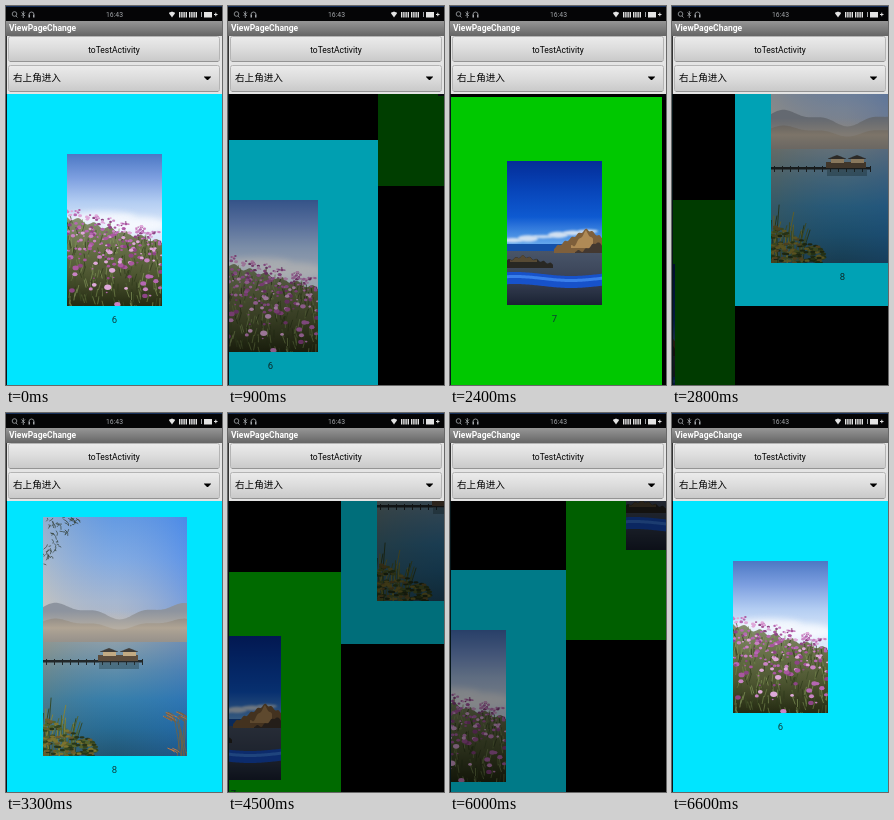
Write an HTML page with a canvas that moves like this. It is 216 by 379 pixels and loops after 6.7 s.

```html
<!DOCTYPE html>
<html lang="zh">
<head>
<meta charset="utf-8">
<title>ViewPageChange</title>
<style>
html, body { margin: 0; width: 100%; height: 100%; overflow: hidden; background: #000; }
canvas { display: block; width: 216px; height: 379px; }
</style>
</head>
<body>
<canvas id="stage"></canvas>
<script>
const W = 216, H = 379, LOOP = 6700;
const PAGE = { x: 1, y: 88, w: 215, h: 298 };
const scale = Math.max(1, window.devicePixelRatio || 1);
const { sin, abs, min, max, round, floor, exp, PI } = Math;

function setup(canvas, w, h) {
  canvas.width = round(w * scale);
  canvas.height = round(h * scale);
  const c = canvas.getContext('2d');
  c.scale(scale, scale);
  return c;
}

function layer(w, h, paint) {
  const canvas = document.createElement('canvas');
  paint(setup(canvas, w, h));
  return canvas;
}

function rect(c, x, y, w, h, fill) {
  c.fillStyle = fill;
  c.fillRect(x, y, w, h);
}

// Evenly spaced colour stops, along y by default.
function fade(c, from, to, colors, across = false) {
  const g = across ? c.createLinearGradient(from, 0, to, 0) : c.createLinearGradient(0, from, 0, to);
  colors.forEach((color, i) => g.addColorStop(i / (colors.length - 1), color));
  return g;
}

// Fills between the curves top(x) and bottom(x).
function band(c, x0, x1, top, bottom, fill) {
  c.fillStyle = fill;
  c.beginPath();
  for (let x = x0; x <= x1; x++) c.lineTo(x, top(x));
  for (let x = x1; x >= x0; x--) c.lineTo(x, bottom(x));
  c.fill();
}

function oval(c, x, y, rx, ry, fill) {
  c.fillStyle = fill;
  c.beginPath();
  c.ellipse(x, y, rx, ry, 0, 0, 2 * PI);
  c.fill();
}

function line(c, color, width, x0, y0, x1, y1, bend = 0) {
  c.strokeStyle = color;
  c.lineWidth = width;
  c.beginPath();
  c.moveTo(x0, y0);
  c.quadraticCurveTo((x0 + x1) / 2 + bend, (y0 + y1) / 2, x1, y1);
  c.stroke();
}

function text(c, s, x, y, font, fill, align = 'left') {
  c.font = font;
  c.textAlign = align;
  c.fillStyle = fill;
  c.fillText(s, x, y);
}

function scatter(n, seed, put) {
  const rnd = () => (seed = (seed * 16807) % 2147483647) / 2147483647;
  const pick = list => list[floor(rnd() * list.length)];
  for (let i = 0; i < n; i++) put(rnd, pick);
}

function blurred(c, radius, paint) {
  c.filter = `blur(${radius}px)`;
  paint();
  c.filter = 'none';
}

function meadow(c, w, h) {
  rect(c, 0, 0, w, h, fade(c, 0, 72, ['#4c78c4', '#7d9fe0', '#b3cdf2', '#dce9fa']));
  blurred(c, 3, () => {
    oval(c, 35, 64, 34, 6, '#f1f6fd');
    oval(c, 68, 71, 32, 8, '#f4f8fe');
  });
  const top = x => 54 + x * .27 + 2 * sin(x * .4);
  band(c, 0, w, x => top(x) + 9, () => h, fade(c, 60, h, ['#8a9577', '#69724a', '#4c5530', '#242a12']));
  scatter(240, 31, (rnd, pick) => {
    const x = rnd() * w, y = top(x) + 12 + rnd() * 90;
    line(c, pick(['#83965b', '#3d4b26', '#2d381b', '#71854b']), .7, x, y, x + rnd() * 6 - 3, y - 8);
  });
  scatter(260, 77, (rnd, pick) => {
    const x = rnd() * w, depth = rnd() * rnd();
    const y = top(x) + depth * (h - top(x)), r = .7 + rnd() * (.7 + depth * 1.8);
    oval(c, x, y, r * 1.3, r, pick(['#c983c4', '#a9579f', '#dfa9da', '#b667b3', '#8d4585']));
  });
}

function beach(c, w, h) {
  rect(c, 0, 0, w, 84, fade(c, 0, 84, ['#052f9c', '#0846bc', '#0f5cd6', '#6aaef2']));
  blurred(c, 1, () => {
    for (let x = 6; x < w; x += 15) oval(c, x, 80 - x * .12, 10, 2.5 + sin(x), '#d6e5f6');
  });
  rect(c, 0, 83, w, 9, '#1552ad');
  rect(c, 0, 90, w, h - 90, fade(c, 90, h, ['#4b576b', '#3b4559', '#1b2335']));
  const hill = (mid, half, rise, base) => x => base - rise * max(0, 1 - abs(x - mid) / half) - sin(x * .9);
  const flat = y => () => y;
  band(c, 47, w, hill(80, 38, 22, 90), flat(92), '#81613d');
  band(c, 64, 86, hill(79, 12, 15, 85), flat(87), '#b48d58');
  band(c, 68, w, hill(90, 14, 9, 90), flat(92), '#453a31');
  band(c, 0, 46, hill(16, 40, 11, 106), flat(107), '#292824');
  band(c, 3, 30, hill(16, 16, 5, 100), flat(101), '#594c36');
  const shore = x => 113 + 2 * sin(x / 18 - 2);
  band(c, 0, w, shore, x => shore(x) + 12, '#1854cf');
  band(c, 0, w, x => shore(x) + 3, x => shore(x) + 6, '#3c82ef');
}

function lake(c, w, h) {
  rect(c, 0, 0, w, 126, fade(c, 0, 126, ['#5f9ae6', '#7fabe6', '#a9bad2', '#c3bbb4']));
  rect(c, 0, 0, w, 126, fade(c, 0, w, ['rgba(225,205,170,.4)', 'rgba(140,160,200,.1)', 'rgba(45,115,235,.4)'], true));
  const ridge = (y, size) => x => y - size * sin(x / 19 + .7) - size * .4 * sin(x / 7);
  const foot = () => 129;
  blurred(c, .6, () => {
    band(c, 0, w, ridge(94, 6), foot, '#8d949f');
    band(c, 0, w, ridge(107, 4), foot, '#807f80');
  });
  rect(c, 0, 94, w, 34, fade(c, 94, 128, ['rgba(215,195,165,0)', 'rgba(215,195,165,.55)', 'rgba(190,178,160,.3)']));
  rect(c, 0, 125, w, h - 125, fade(c, 125, h, ['#98a3a8', '#648fa8', '#397fa8', '#286b91', '#205069']));
  rect(c, 0, 125, w, h - 125, fade(c, 0, w, ['rgba(120,120,85,.3)', 'rgba(40,120,190,.1)', 'rgba(25,100,205,.35)'], true));

  rect(c, 0, 143, 100, 2.5, '#22282a');
  for (let x = 3; x < 100; x += 8) rect(c, x, 142, 1, 6, '#22282a');
  rect(c, 55, 138, 40, 6, '#5c4c3c');
  for (const x of [60, 80]) {
    rect(c, x, 134, 13, 5, '#c2aa83');
    band(c, x - 3, x + 15, u => 131 + abs(u - x - 6) * .4, () => 135, '#3f3c38');
  }
  rect(c, 56, 146, 40, 6, 'rgba(34,60,68,.4)');

  scatter(60, 51, rnd => {
    const x = rnd() * 34, y = rnd() * max(4, 52 - x * 1.5);
    line(c, '#35423a', .7, x, y, x + rnd() * 9 - 4, y + rnd() * 7, 2);
  });
  scatter(26, 19, (rnd, pick) => {
    const x = rnd() * 32, tall = 25 + rnd() * 45 * (1 - x / 40);
    line(c, pick(['#53632a', '#33441f', '#8a8534']), .9, x, h, x + rnd() * 14 - 4, h - tall, -3);
  });
  scatter(170, 43, (rnd, pick) => {
    const x = rnd() * 54, y = h - rnd() * (40 - x * .5);
    oval(c, x, y, 2.6, 1.2, pick(['#34451f', '#54632a', '#263419', '#7d742f', '#6b5a2c']));
  });
  scatter(26, 88, (rnd, pick) => {
    const x = w - rnd() * 24, y = pick([193, 229]) + rnd() * 8 + (w - x) * .1;
    line(c, pick(['#c4783f', '#a87245', '#7d5f3c']), 1, x, y, x + 7, y + 4, 2);
  });
  scatter(7, 12, rnd => line(c, '#75623f', .8, w - rnd() * 10, h, w - rnd() * 16, 200 + rnd() * 20));
}

const pages = [
  { label: '6', bg: '#00e5ff', w: 95, h: 152, y: 60, paint: meadow },
  { label: '7', bg: '#00cc00', w: 95, h: 144, y: 64, paint: beach },
  { label: '8', bg: '#00e5ff', w: 144, h: 239, y: 16, paint: lake }
].map(p => layer(PAGE.w, PAGE.h, c => {
  rect(c, 0, 0, PAGE.w, PAGE.h, p.bg);
  c.save();
  c.translate(round((PAGE.w - p.w) / 2 + .1), p.y);
  c.beginPath();
  c.rect(0, 0, p.w, p.h);
  c.clip();
  p.paint(c, p.w, p.h);
  c.restore();
  text(c, p.label, PAGE.w / 2, p.y + p.h + 16.5, '9.5px Roboto, sans-serif', '#103a3a', 'center');
}));

function statusBar(c) {
  const grey = '#a4a7ab', white = '#e4e4e4';
  rect(c, 0, 0, W, 15, '#050506');
  rect(c, 0, 0, W, 1, '#17305a');
  c.strokeStyle = grey;
  c.lineWidth = .8;
  c.beginPath();
  c.arc(8.5, 8, 2.3, 0, 2 * PI);
  c.stroke();
  line(c, grey, .8, 10, 10, 11.5, 11.5);
  line(c, grey, .8, 17.3, 5, 17.3, 12);
  line(c, grey, .8, 15.5, 6.5, 19, 10);
  line(c, grey, .8, 15.5, 10, 19, 6.5);
  c.beginPath();
  c.arc(25.5, 8.5, 2.5, PI, 0);
  c.stroke();
  for (const x of [22.5, 27]) rect(c, x, 8.5, 1.5, 3, grey);
  text(c, '16:43', 108.5, 11, '6.8px Roboto, sans-serif', grey, 'center');
  band(c, 163, 169, x => 5.5 + abs(x - 166) * .4, x => 11.5 - abs(x - 166) * 1.4, white);
  for (const x of [173, 183])
    for (let i = 0; i < 4; i++) rect(c, x + i * 2.2, 6, 1.4, 5.5, white);
  rect(c, 195, 6, 1, 5, grey);
  rect(c, 198, 6, 8, 5.5, white);
  rect(c, 208, 8, 3.5, 1, white);
  rect(c, 209.3, 6.7, 1, 3.5, white);
}

function box(c, y, h) {
  c.fillStyle = fade(c, y, y + h, ['#ececec', '#dcdcdc', '#c8c8c8']);
  c.strokeStyle = '#b4b4b4';
  c.lineWidth = 1;
  c.beginPath();
  c.roundRect(2.5, y + .5, 211, h - 1, 2);
  c.fill();
  c.stroke();
  rect(c, 4, y + h - 1, 208, 1, '#949494');
}

const header = layer(W, 88, c => {
  statusBar(c);
  rect(c, 0, 15, W, 15, fade(c, 15, 30, ['#969696', '#7e7e7e', '#656565']));
  text(c, 'ViewPageChange', 3, 25, 'bold 8.5px Roboto, sans-serif', '#fff');
  rect(c, 0, 30, W, 58, '#e4e4e4');
  box(c, 30, 26);
  box(c, 59, 27);
  text(c, 'toTestActivity', 108, 46.5, '8.5px Roboto, sans-serif', '#000', 'center');
  text(c, '右上角进入', 7, 75, '9.6px "Noto Sans CJK SC", "Noto Sans CJK", sans-serif', '#000');
  band(c, 198, 205, () => 70.5, x => 74.5 - abs(x - 201.5), '#000');
  rect(c, 0, 30, 1, 58, '#333');
});

const moves = [
  { at: 700, from: 0, to: 1 },
  { at: 2400, from: 1, to: 2 },
  { at: 4200, from: 2, to: 1 },
  { at: 5200, from: 1, to: .972, jump: true },
  { at: 5700, from: .972, to: 0 }
];

// Slow drag, fling, then settle, in steps of 100 ms.
function swipe(ms) {
  const n = floor(ms / 100);
  return n < 9 ? 1 - exp(-.0413 * (n + .7) ** 2.2) : 1;
}

function scrollAt(t) {
  const m = moves.filter(m => t >= m.at).pop();
  return m ? m.from + (m.to - m.from) * (m.jump ? 1 : swipe(t - m.at)) : 0;
}

const ctx = setup(document.getElementById('stage'), W, H);

function draw(t) {
  rect(ctx, 0, 0, W, H, '#000');
  const scroll = scrollAt(t);
  pages.forEach((page, i) => {
    const pos = i - scroll;
    if (abs(pos) >= 1) return;
    const x = PAGE.x + round(pos * PAGE.w);
    const y = PAGE.y + round(-pos * PAGE.h * (pos > 0 ? 1 : .5));
    ctx.globalAlpha = 1 - abs(pos);
    ctx.drawImage(page, x, y, PAGE.w, PAGE.h);
  });
  ctx.globalAlpha = 1;
  rect(ctx, 0, PAGE.y, 1, H - PAGE.y, '#06161a');
  ctx.drawImage(header, 0, 0, W, 88);
}

const start = performance.now();
function tick() {
  draw((performance.now() - start) % LOOP);
  requestAnimationFrame(tick);
}
tick();
</script>
</body>
</html>
```
